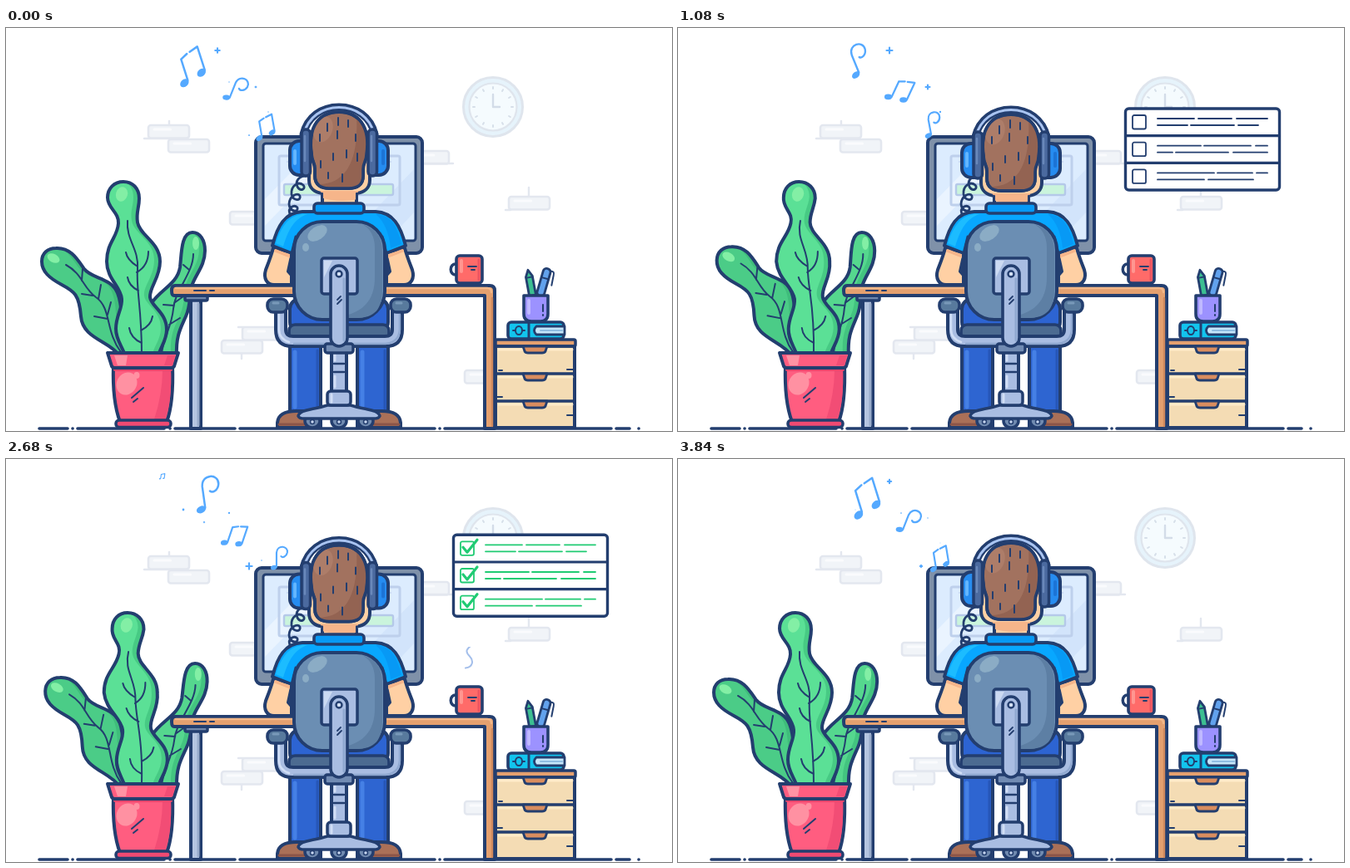
Write an HTML page with a canvas that moves like this. It is 800 by 485 pixels and loops after 3880 ms.

```html
<!DOCTYPE html>
<html lang="en">
<head>
<meta charset="utf-8">
<title>Working at the desk</title>
<style>
html, body { margin: 0; width: 100%; height: 100%; overflow: hidden; background: #fff; }
canvas { display: block; width: 800px; height: 485px; }
</style>
</head>
<body>
<canvas id="stage" width="800" height="485"></canvas>
<script>
const ctx = document.getElementById('stage').getContext('2d');
const LOOP = 3880, BEAT = LOOP / 4, TAU = Math.PI * 2;
const NAVY = '#233e6f', NOTE = '#55a9ff', GREEN = '#20cb73', METAL = '#a9bde2', SKIN = '#ffd0a4';

const clamp = (v, lo = 0, hi = 1) => Math.min(hi, Math.max(lo, v));
const ramp = (t, from, to) => clamp((t - from) / (to - from));

function paint(path, fill, stroke, width) {
  if (fill) { ctx.fillStyle = fill; ctx.fill(path); }
  if (stroke) { ctx.strokeStyle = stroke; ctx.lineWidth = width; ctx.stroke(path); }
}
const shape = (d, fill, stroke = NAVY, width = 4) => paint(new Path2D(d), fill, stroke, width);
const line = (d, color = NAVY, width = 2) => shape(d, null, color, width);
function box(x, y, w, h, r, fill, stroke = NAVY, width = 4) {
  const p = new Path2D();
  p.roundRect(x, y, w, h, r);
  paint(p, fill, stroke, width);
}
function oval(x, y, rx, ry, fill, stroke, width = 4, angle = 0) {
  const p = new Path2D();
  p.ellipse(x, y, rx, ry, angle, 0, TAU);
  paint(p, fill, stroke, width);
}
function group(draw) { ctx.save(); draw(); ctx.restore(); }
function clipTo(d, draw) { group(() => { ctx.clip(new Path2D(d)); draw(); }); }
const bend = (d, move) =>
  d.replace(/(-?[\d.]+) (-?[\d.]+)/g, (_, x, y) => move(+x, +y).join(' '));

// Smooth curve through rows of [time, value, value, ...]
function track(keys, t, col) {
  const last = keys.length - 1;
  let i = 1;
  while (i < last && t > keys[i][0]) i++;
  const key = j => keys[clamp(j, 0, last)];
  const slope = j => (key(j + 1)[col] - key(j - 1)[col]) / (key(j + 1)[0] - key(j - 1)[0]);
  const a = key(i - 1), b = key(i), span = b[0] - a[0], u = ramp(t, a[0], b[0]);
  const u2 = u * u, u3 = u2 * u;
  return a[col] * (2 * u3 - 3 * u2 + 1) + b[col] * (3 * u2 - 2 * u3)
    + span * (slope(i - 1) * (u3 - 2 * u2 + u) + slope(i) * (u3 - u2));
}

function wall() {
  const pale = '#e3e7ef';
  const bricks = [[171, 117, 49], [195, 134, 49], [490, 148, 42], [604, 203, 49],
    [269, 221, 49], [259, 376, 49], [284, 360, 49], [551, 412, 49]];
  for (const [x, y, w] of bricks) {
    box(x, y, w, 15.5, 3, '#f1f4f8', pale, 2.6);
    line(`M${x + 7} ${y + 5}h${w * .4}`, '#fafbfd', 3);
  }
  line('M166 133H195M196 112V117M500 163H537M628 192V202M600 219H606M283 392V398M279 360H286', pale, 2.4);

  oval(585, 95, 35.5, 35.5, '#e6f3fb', '#dfe5ed', 3);
  oval(585, 95, 28.5, 28.5, '#f5fbfe', '#dfe5ed', 2.2);
  for (let i = 0; i < 12; i++) {
    const a = i * TAU / 12, c = Math.cos(a), s = Math.sin(a);
    line(`M${585 + 22 * c} ${95 + 22 * s}L${585 + 24 * c} ${95 + 24 * s}`, '#d6dfe9', 2);
  }
  line('M585 80V95H593', '#d3dce8', 2.4);
}

function monitor() {
  box(300, 131, 200, 140, 7, '#7f91a9');
  box(309, 139, 183, 117, 3, '#dcecfe', NAVY, 3);
  shape('M311 206L374 141H405L311 238Z', '#eaf4ff', null);
  shape('M490 170V222L460 254H410Z', '#d2e4fb', null);
  box(328, 154, 145, 59, 2, null, '#bed0ec', 3);
  box(334, 188, 131, 13, 2, '#caf4dc', '#b5c9e9', 2.4);
  line('M338 161H462', '#c8d9f1', 2);
}

const leafMain = 'M141 185C152 185 160 193 160 205C160 217 156 222 158 234C161 250 185 258 185 281C185 301 172 312 173 324C174 335 193 342 193 363C193 376 186 383 183 394L143 394C139 382 132 375 132 362C132 346 140 338 139 326C138 311 121 302 121 281C121 258 134 252 135 235C136 222 122 217 122 204C122 193 130 185 141 185Z';
const leafLeft = 'M60 265C77 264 85 277 94 290C103 302 126 300 134 319C141 336 137 352 146 394L136 394C124 376 92 374 90 347C88 321 82 317 67 309C52 301 43 293 43 281C43 271 50 265 60 265Z';
const leafRight = 'M225 246C234 246 240 255 240 268C240 285 230 295 225 308C220 321 224 332 217 347C211 361 205 370 206 394L176 394C178 370 165 350 176 331C186 315 207 308 210 288C212 272 211 246 225 246Z';

function leaf(d, veins, glow, move, light, dark) {
  const outline = bend(d, move);
  clipTo(outline, () => {
    shape(outline, dark, null);
    ctx.translate(-7, -2);
    shape(outline, light, null);
  });
  const [x, y] = move(glow[0], glow[1]);
  oval(x, y, glow[2], glow[3], '#83efa5', null, 0, glow[4]);
  line(bend(veins, move), NAVY, 2);
  line(outline, NAVY, 4);
}

function plant(t) {
  const phase = t / LOOP * TAU, k = (1 - Math.cos(phase)) / 2, side = Math.sin(phase);
  leaf(leafRight,
    'M226 272C226 295 204 315 202 338C200 360 190 372 188 392M221 291L214 285M203 334L190 333M203 331L214 323M197 357L210 349',
    [229, 259, 4, 8, 0],
    (x, y) => { const e = (395 - y) / 149; return [x - 3.3 * side * e - 1, y]; }, '#55d78e', '#43c480');
  leaf(leafLeft,
    'M72 285C92 296 92 312 108 324C127 337 119 365 138 390M91 304L92 290M104 322L91 320M111 326L114 309M122 350L106 347M122 345L126 330',
    [57, 277, 8, 5, .5],
    (x, y) => { const e = (395 - y) / 130; return [x + 7 * k * e, y - 3 * k * e]; }, '#4bcc87', '#3fbd7b');
  leaf(leafMain,
    'M146 232C144 255 160 266 158 290C156 315 163 335 163 392M157 294C168 288 171 278 171 269M158 287C150 282 145 276 144 270M159 316C151 312 147 307 146 300M162 364C170 360 175 354 176 347M163 379C154 375 149 368 148 361',
    [139, 200, 7, 9, .3],
    (x, y) => [x + 8.5 * k * (395 - y) / 195 * Math.cos(Math.PI * (y - 200) / 75), y], '#5be096', '#47ca84');

  shape('M129 406H200C201 435 199 458 193 474H137C131 458 128 435 129 406Z', '#ff5d80');
  shape('M188 411H198C199 436 197 456 191 471H178Q188 440 188 411Z', '#f24d75', null);
  line('M131 411H198', '#e8476d', 4);
  shape('M122 391H207L202 407Q201 409 198 409H131Q128 409 127 407Z', '#ff5d80');
  shape('M130 394H146L144 406H134Z', '#ff93a4', null);
  shape('M194 394H203L200 406H190Z', '#f24d75', null);
  box(132, 472, 66, 8.5, 4, '#ef4a72', NAVY, 3.5);
  oval(145, 428, 12, 14, '#ff91a2', null, 0, .5);
  oval(157, 418, 3.5, 4, '#ff91a2', null);
  line('M151 445L165 433M153 450L158 446');
}

function ground() {
  line('M40 482H74M80 482H80.1M86 482H190M197 482H197.1M203 482H275M281 482H515M521 482H521.1M527 482H727M733 482H749M760 482H760.1', NAVY, 3.6);
}

function torso() {
  shape('M321 265C318 276 315 283 312 291C309 301 313 309 322 309H347V302L339 293L344 270Z', SKIN);
  shape('M479 265C482 276 485 283 488 291C491 301 487 309 478 309H453V302L461 293L456 270Z', SKIN);
  line('M324 268L342 275M476 268L458 275', '#f6b58a', 4);
  shape('M320 262C326 238 335 222 356 221H444C465 222 474 238 480 262L457 271V310H343V271Z', '#08a7ff');
  shape('M324 259C331 238 340 226 356 224H362C344 230 338 247 333 263Z', '#1cbcff', null);
  shape('M444 224C464 225 470 240 475 260L462 265C460 246 454 232 444 224Z', '#0799f5', null);
  line('M343 271L348 251M457 271L452 251', NAVY, 3);
}

function head(t) {
  const drop = 1.5 - 1.5 * Math.cos(t / (LOOP / 2) * TAU);
  group(() => {
    ctx.translate(0, drop);
    box(341, 136, 26, 41, 11, '#268cf0');
    box(433, 136, 26, 41, 11, '#268cf0');
    line('M347 148V163', '#63b6ff', 4);
    line('M453 148V163', '#1c74d6', 4);
    const face = 'M364 155V183C364 193 371 198 380 199V216H421V199C430 198 437 193 437 183V155Z';
    shape(face, SKIN);
    clipTo(face, () => shape('M378 196H423V206Q400 211 378 204Z', '#f6b58a', null));
    line(face);
  });
  box(370, 211, 60, 12, 4, '#0799f5', NAVY, 3.6);
  line('M364 178C352 177 347 184 350 191C354 198 361 193 357 189C351 184 342 190 343 200C345 209 355 208 353 202C350 197 340 203 340 212C341 222 352 222 350 216C346 212 338 216 341 224', NAVY, 2.8);
  group(() => {
    ctx.translate(0, drop);
    line('M357 128C362 107 379 95 400 95C421 95 438 107 443 128', NAVY, 9);
    line('M358 127C363 107 380 95.5 400 95.5C420 95.5 437 107 442 127', '#a9c4f1', 3);
    const hair = 'M367 152C362 118 377 101 400 101C423 101 438 118 433 152C433 161 429 161 429 170V178C429 189 421 193 412 193H388C379 193 371 189 371 178V170C371 161 367 161 367 152Z';
    shape(hair, '#a2725f');
    clipTo(hair, () => {
      shape('M436 110V196H372V188C408 190 424 160 421 106Z', '#936352', null);
      oval(381, 122, 11, 16, '#ad7d69', null, 0, .35);
    });
    line(hair, NAVY, 3.6);
    line('M399 108V117M386 115V124M411 111V119M377 128V136M398 124V133M420 128V136M378 160V168M393 151V159M409 147V156M422 151V160M387 174V181M404 176V185', NAVY, 2);
    for (const x of [355, 435]) {
      box(x, 122, 10.5, 56, 5, '#4b6a9f', NAVY, 3.5);
      line(`M${x + 4} 130V160`, '#6988ba', 2.5);
    }
  });
}

function desk() {
  box(222, 326, 12, 156, 0, '#b5c5e1');
  line('M231 332V478', '#98abcb', 3);
  box(215, 321, 27, 7, 2, '#6f87ac', NAVY, 3.5);
  shape('M575 322H202Q199 322 199 316Q199 310 203 310H581Q587 310 587 316V482H575Z', '#e4a06f');
  line('M204 313H578Q583 313 583 318', '#f2b889', 2.4);
  line('M584 325V479', '#cf895d', 2.4);
  line('M226 316H240M245 316H250');
}

function chair() {
  box(341, 326, 118, 40, 12, '#2d64d2');
  for (const x of [341, 422]) {
    box(x, 378, 37, 87, 0, '#2e65d1');
    line(`M${x + 6} 390V456`, '#4580e5', 5);
    line(`M${x + 33} 388V458`, '#2656b8', 3);
  }
  shape('M326 481V475C327 464 336 461 349 461H378V481Z', '#aa7058');
  shape('M474 481V475C473 464 464 461 451 461H422V481Z', '#aa7058');
  line('M328 477H372M428 477H472', '#8c5548', 3);

  box(391, 382, 18, 60, 0, METAL);
  line('M394 404H406M394 414H406', NAVY, 2.4);
  line('M395 386V400M395 419V432', '#d1def5', 3);
  for (const x of [368, 400, 432]) {
    oval(x, 473, 9, 8, '#718bb0', NAVY, 3.5);
    oval(x, 474, 2.5, 2.5, '#c6d5ef', NAVY, 1.5);
  }
  shape('M351 467C353 459 367 460 386 454H414C433 460 447 459 449 467Q448 470 442 470H358Q352 470 351 467Z', METAL, NAVY, 3.5);
  box(386, 437, 28, 17, 4, METAL, NAVY, 3.5);
  line('M391 441V450', '#d1def5', 3);

  box(340, 357, 120, 20, 7, '#4c6b91', NAVY, 3.6);
  shape('M324 341H336V363Q336 371 345 371H455Q464 371 464 363V341H476V363Q476 383 456 383H344Q324 383 324 363Z', METAL);
  line('M328 345V363Q328 374 340 378', '#d0def6', 2.6);
  line('M346 380H456Q472 378 473 363V345', '#8fa8d0', 2.4);
  for (const x of [314, 462]) {
    box(x, 326, 24, 16, 7, '#587a9d', NAVY, 3.6);
    line(`M${x + 7} 331H${x + 13}`, '#7999b9', 3);
  }
  box(383, 380, 34, 11, 3, '#718bb3', NAVY, 3.5);

  box(346, 233, 109, 118, 34, '#6b8eb3');
  shape('M428 236C446 242 452 253 452 270V315C452 338 443 349 421 349H386C431 347 443 326 443 300V265C443 251 438 242 428 236Z', '#5d7fa4', null);
  oval(374, 247, 13, 8, '#8bacc5', null, 0, -.6);
  oval(360, 264, 4, 5, '#8bacc5', null);
  box(379, 277, 43, 43, 3, METAL, NAVY, 3.5);
  shape('M382 280H392L382 300Z', '#ccdaf2', null);
  box(390, 286, 20, 97, 10, METAL, NAVY, 3.6);
  line('M406 302V376', '#8fa8d0', 3);
  oval(400, 296, 3.5, 3.5, '#d4e1f7', NAVY, 2.4);
  line('M398 327L402 323M398 332L403 327', NAVY, 1.8);
}

function cabinet() {
  box(588, 377, 95, 104, 0, '#f4dcb4');
  box(588, 375, 96, 8, 2, '#e4a06f', NAVY, 3.5);
  for (const y of [383, 416, 449]) {
    line(`M592 ${y + 4}H680`, '#ffebc9', 3);
    line(`M588 ${y}H683`, NAVY, 3.6);
    shape(`M621 ${y}H650L648 ${y + 6}Q647 ${y + 8} 644 ${y + 8}H627Q624 ${y + 8} 623 ${y + 6}Z`, '#d98d5f', NAVY, 2.8);
  }
  line('M592 412H596M674 411H682M590 444H596M674 466H682', NAVY, 2);

  box(603, 354, 67, 20, 4, '#12c4ee', NAVY, 3.6);
  shape('M671 359H637Q632 364 637 369H671Z', '#c5e6fa', NAVY, 2.8);
  line('M642 364H668', '#8fbce2', 2);
  line('M628 355V373', NAVY, 3);
  oval(616, 364, 4, 5, null, NAVY, 2);
  line('M609 364H611M621 364H623', NAVY, 2);

  group(() => {
    ctx.translate(630, 308);
    ctx.rotate(-.18);
    shape('M-4 14V-9L0 -17L4 -9V14Z', '#3cbe91', NAVY, 2.8);
    line('M-4 -8H4', NAVY, 1.8);
  });
  group(() => {
    ctx.translate(646, 306);
    ctx.rotate(.28);
    box(-4.5, -17, 9, 34, 4, '#62a2ed', NAVY, 2.8);
    line('M-4 -5H4', NAVY, 2);
    line('M4 -15Q9 -17 9 -11L10 1', NAVY, 2);
  });
  shape('M622 322H651V344Q651 353 642 353H631Q622 353 622 344Z', '#9c92ff', NAVY, 3.6);
  line('M628 328V343', '#c0b9ff', 4);
  line('M645 333V341M645 345V346');
}

function cup(t) {
  if (t > 1500 && t < 3300) group(() => {
    ctx.beginPath();
    ctx.rect(540, 226, 40, 47);
    ctx.clip();
    ctx.translate(0, (2280 - t) * .046);
    line('M552 270C561 269 562 261 557 256C551 250 553 247 560 242C563 240 564 237 565 234', '#a4bfeb', 2);
  });
  line('M541 284C532 283 532 298 541 297', NAVY, 3.5);
  box(541, 274, 31, 33, 4, '#ff6b69', NAVY, 3.6);
  line('M547 280V293', '#ff9690', 4);
  line('M568 279V303', '#ed5561', 3);
  line('M555 287H565M559 291H563', NAVY, 1.8);
}

// age, x, y, size, tilt in degrees
const flight = [
  [0, 352, 127, .4, 0], [400, 330, 120, .62, 8], [700, 311, 118, .68, -12], [1000, 290, 113, .69, 10],
  [1420, 276, 92, .71, 16], [1640, 275, 74, .74, 26], [1800, 267, 73, .76, 22], [2010, 260, 53, .8, 8],
  [2400, 239, 43, .98, -3], [2600, 224, 45, 1, -19], [2800, 210, 39, .82, -16], [2980, 203, 39, .64, -4],
  [3350, 189, 22, .22, 5], [3500, 182, 15, 0, 8]];

function notes(t) {
  for (let i = 0; i < 4; i++) {
    const age = (t + 700 - i * BEAT + LOOP) % LOOP;
    if (age >= 3500) continue;
    const [x, y, size, tilt] = [1, 2, 3, 4].map(col => track(flight, age, col));
    group(() => {
      ctx.globalAlpha = ramp(age, -60, 260);
      ctx.translate(x, y);
      ctx.rotate(tilt * TAU / 360);
      ctx.scale(size, size);
      const width = 1.5 / Math.max(size, .3) + 1;
      if (i % 2) {
        oval(-5, 18, 6, 4.2, NOTE, null, 0, -.4);
        line('M0 16L-2 -10C-2 -26 19 -25 18 -12C17 -4 10 -1 7 -4', NOTE, width);
      } else {
        oval(-14, 19, 6, 4.4, NOTE, null, 0, -.4);
        oval(10, 14, 6, 4.4, NOTE, null, 0, -.4);
        line('M-9 17L-8 -10M-8 -10L1 -14M5 -15L16 -18L15 12', NOTE, width);
      }
    });
  }
  const twinkles = [[254, 27, 120, 3.5], [238, 76, 500, 3.2], [300, 71, 230, 3.2], [292, 129, 720, 3.6],
    [213, 61, 715, 1.4], [315, 101, 170, 1.2], [307, 122, 600, 1.1], [268, 65, 800, 1.2]];
  for (const [x, y, peak, size] of twinkles) {
    const r = size * (.25 + Math.cos((t - peak) / BEAT * TAU)) / 1.25;
    if (r <= 0) continue;
    if (size < 2) oval(x, y, r, r, NOTE);
    else line(`M${x - r} ${y}H${x + r}M${x} ${y - r}V${y + r}`, NOTE, Math.min(2.2, r + .5));
  }
}

const drift = [[400, 106], [760, 100], [1080, 97], [1640, 101], [2280, 91], [3080, 94], [3500, 100]];
const rows = [
  'M576 12H620M625 12H665M671 12H708M576 20H612M616 20H668M673 20H697',
  'M576 12H628M632 12H688M694 12H708M576 20H594M598 20H661M667 20H708',
  'M576 12H644M648 12H690M695 12H708M576 20H632M637 20H691'];

function blend(k) {
  const from = [35, 62, 111], to = [32, 203, 115];
  return `rgb(${from.map((v, i) => Math.round(v + (to[i] - v) * k))})`;
}

function checklist(t) {
  const alpha = Math.min(ramp(t, 440, 800), 1 - ramp(t, 3040, 3480));
  if (!alpha) return;
  group(() => {
    ctx.globalAlpha = alpha;
    ctx.translate(0, track(drift, t, 1));
    box(537.5, 0, 185, 98, 4, '#fff', NAVY, 3.4);
    rows.forEach((text, i) => {
      const start = 1320 + i * 440, color = blend(ramp(t, start, start + 280));
      group(() => {
        ctx.translate(0, i * 32.7);
        if (i) line('M538 0H722', NAVY, 3.2);
        box(546, 8, 16, 16.5, 2, null, color, 1.8);
        line(text, color, 1.8);
        const drawn = ramp(t, start + 110, start + 310);
        if (drawn) {
          ctx.setLineDash([27 * drawn, 40]);
          line('M549 15L554 21L566 6', GREEN, 3.2);
        }
      });
    });
  });
}

function draw(now) {
  const t = now % LOOP;
  ctx.fillStyle = '#fff';
  ctx.fillRect(0, 0, 800, 485);
  ctx.lineCap = ctx.lineJoin = 'round';
  wall();
  ground();
  monitor();
  notes(t);
  plant(t);
  torso();
  head(t);
  desk();
  chair();
  cabinet();
  cup(t);
  checklist(t);
}

const begun = performance.now();
function tick() {
  draw(performance.now() - begun);
  requestAnimationFrame(tick);
}
tick();
</script>
</body>
</html>
```
